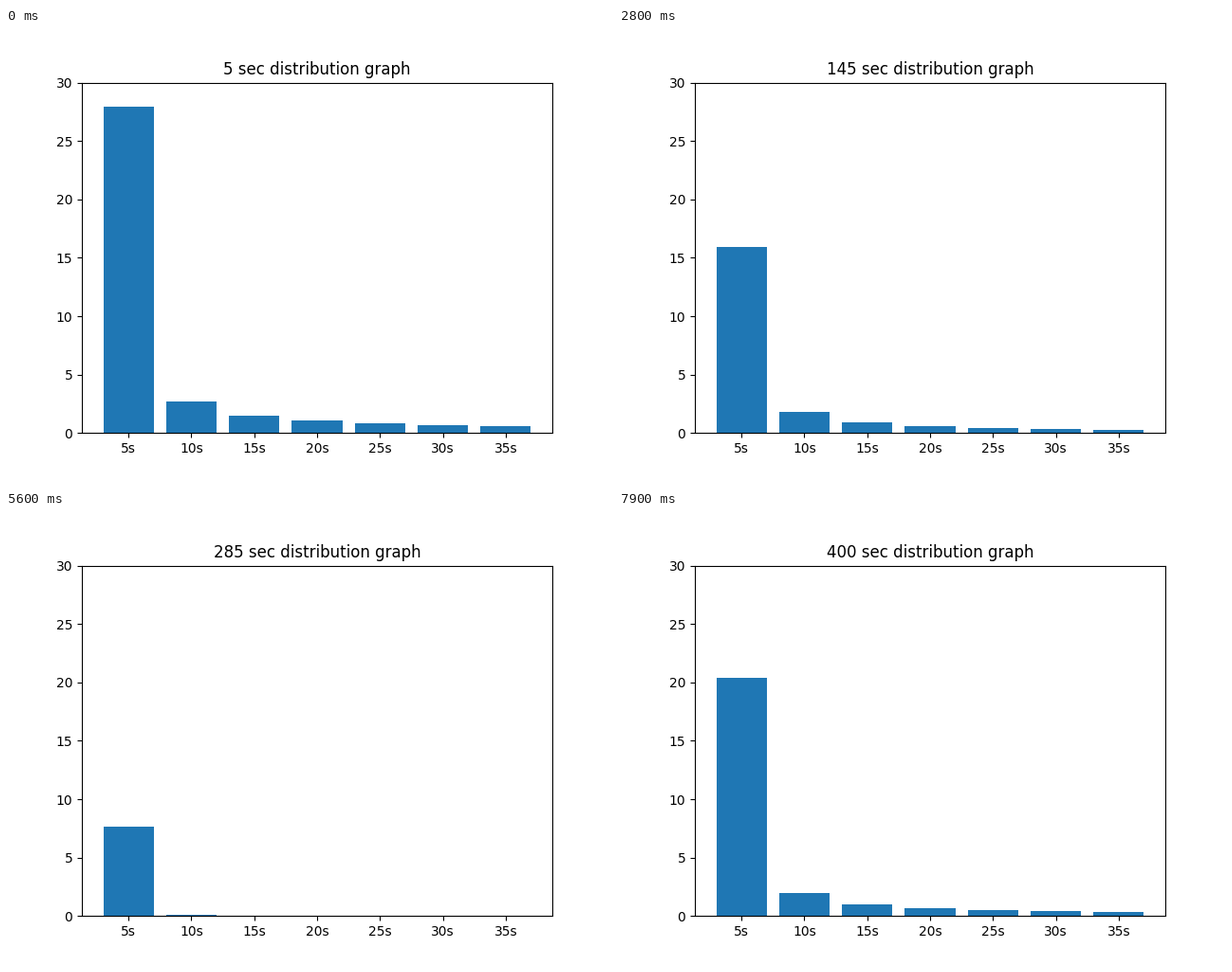
These frames come from a looping animation (640x480 px, 8 s). A matplotlib script:

```python
import numpy as np
import matplotlib.pyplot as plt
from matplotlib.animation import FuncAnimation

FRAMES = 80
INTERVAL = 100  # ms
STEP = 5        # seconds of data per frame
BARS = 7

# key points: frame, first bar, second bar
KEYS = [
    (0, 27.94, 2.69),
    (16, 26.72, 2.05),
    (28, 15.93, 1.80),
    (44, 13.00, 0.99),
    (56, 7.65, 0.10),
    (63, 14.50, 1.75),
    (71, 21.44, 2.53),
    (79, 20.39, 1.96),
]
key_frames, firsts, seconds = zip(*KEYS)


def heights(frame):
    """First bar on its own, then a power-law tail that steepens as it sinks."""
    first = np.interp(frame, key_frames, firsts)
    second = np.interp(frame, key_frames, seconds)
    rank = np.arange(1, BARS)
    tail = second / rank ** (1.3 - 0.16 * second)
    return [first, *tail]


fig, ax = plt.subplots(figsize=(6.4, 4.8), dpi=100)
labels = [f"{STEP * (i + 1)}s" for i in range(BARS)]
bars = ax.bar(labels, heights(0), color="#1f77b4")
ax.set_ylim(0, 30)
title = ax.set_title("")


def update(frame):
    for bar, height in zip(bars, heights(frame)):
        bar.set_height(height)
    title.set_text(f"{STEP * (frame + 1)} sec distribution graph")
    return [*bars, title]


anim = FuncAnimation(fig, update, frames=FRAMES, interval=INTERVAL,
                     init_func=lambda: update(0), repeat=True, repeat_delay=0)
plt.show()
```
